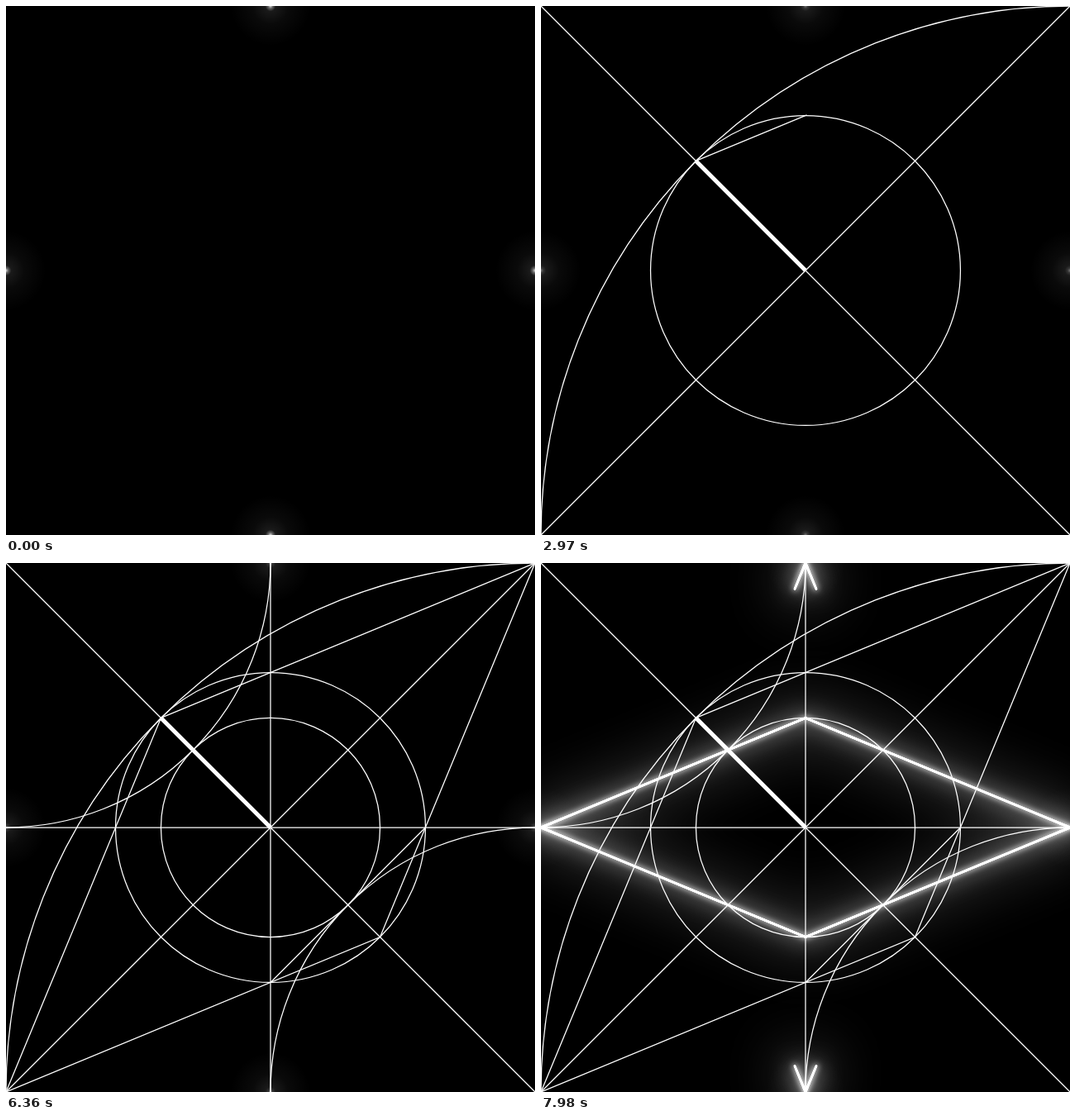
Animation, 640 px wide and 640 px high, one loop 8 s. Source, as an HTML page with a canvas:

```html
<!DOCTYPE html>
<html lang="en">
<head>
<meta charset="utf-8">
<title>Construction lines</title>
<style>
  html, body { margin: 0; width: 100%; height: 100%; overflow: hidden; background: #000; }
  canvas { display: block; width: 100vw; height: 100vh; }
</style>
</head>
<body>
<canvas id="stage" width="640" height="640"></canvas>
<script>
const LOOP = 8000, S = 640, C = S / 2, PI = Math.PI;
const INNER = C * (Math.SQRT2 - 1);   // also the half height of the rhombi
const OUTER = INNER * Math.SQRT2;
const LO = C - INNER, HI = C + INNER;
const ctx = document.getElementById('stage').getContext('2d');

const clamp = x => Math.min(1, Math.max(0, x));
const smooth = s => s * s * (3 - 2 * s);
const strong = s => s < .5 ? (2 * s) ** 2.5 / 2 : 1 - (2 - 2 * s) ** 2.5 / 2;
const part = (t, start, dur, ease = smooth) => ease(clamp((t - start) / dur));

function poly(...p) {
  const path = new Path2D();
  let len = 0;
  path.moveTo(p[0], p[1]);
  for (let i = 2; i < p.length; i += 2) {
    path.lineTo(p[i], p[i + 1]);
    len += Math.hypot(p[i] - p[i - 2], p[i + 1] - p[i - 1]);
  }
  return { path, len };
}

function arc(x, y, r, from, sweep) {
  const path = new Path2D();
  path.arc(x, y, r, from, from + sweep);
  return { path, len: r * sweep };
}

// shape, start, duration
const strokes = [
  [poly(0, S, S, 0), 50, 620],
  [poly(S, S, 0, 0), 50, 620],
  [arc(S, S, S, PI, PI / 2), 671, 712],
  [arc(C, C, OUTER, -.75 * PI, 2 * PI), 2100, 695],
  [poly(LO, LO, S, 0, HI, HI, 0, S, LO, LO), 2810, 966],
  [poly(C, C + OUTER, C + OUTER, C), 3630, 810],
  [arc(0, 0, C, 0, PI / 2), 4449, 611],
  [arc(S, S, C, PI, PI / 2), 4449, 611],
  [arc(C, C, INNER, -.75 * PI, 2 * PI), 5053, 592],
  [poly(S, C, 0, C), 5630, 707],
  [poly(C, S, C, 0), 5630, 707]
];

function trim({ path, len }, f) {
  if (f <= 0) return;
  ctx.setLineDash(f < 1 ? [len * f, len * 2] : []);
  ctx.stroke(path);
  ctx.setLineDash([]);
}

function radius(t) {
  const grow = part(t, 1370, 540);
  if (!grow) return;
  const a = -.75 * PI + 2 * PI * part(t - 6, 2100, 695);
  const r = OUTER * grow;
  ctx.lineWidth = 5;
  ctx.stroke(poly(C, C, C + r * Math.cos(a), C + r * Math.sin(a)).path);
}

function spark(x, y, core) {
  const g = ctx.createRadialGradient(x, y, 0, x, y, 48);
  g.addColorStop(0, `rgba(255,255,255,${core})`);
  g.addColorStop(.06, `rgba(255,255,255,${core * .45})`);
  g.addColorStop(.13, 'rgba(255,255,255,.1)');
  g.addColorStop(.45, 'rgba(255,255,255,.04)');
  g.addColorStop(1, 'rgba(255,255,255,0)');
  ctx.fillStyle = g;
  ctx.fillRect(x - 48, y - 48, 96, 96);
}

// Four arms growing from two opposite tips of a rhombus
function arms(f, upright) {
  const path = new Path2D();
  for (const tip of [0, S]) {
    for (const side of [LO, HI]) {
      const u = tip + (C - tip) * f, v = C + (side - C) * f;
      if (upright) { path.moveTo(C, tip); path.lineTo(v, u); }
      else { path.moveTo(tip, C); path.lineTo(u, v); }
    }
  }
  return path;
}

// width, blur, opacity
const halos = [[30, 70, .3], [12, 26, .38], [5, 7, .65]];

function glow(path) {
  ctx.save();
  ctx.lineCap = ctx.lineJoin = 'round';
  ctx.globalCompositeOperation = 'lighter';
  for (const [w, blur, a] of halos) {
    ctx.save();
    ctx.translate(-2000, 0);
    ctx.shadowOffsetX = 2000;
    ctx.shadowBlur = blur;
    ctx.shadowColor = `rgba(255,255,255,${a})`;
    ctx.lineWidth = w;
    ctx.stroke(path);
    ctx.restore();
  }
  ctx.lineWidth = 2.6;
  ctx.stroke(path);
  ctx.restore();
}

function draw(t) {
  ctx.fillStyle = '#000';
  ctx.fillRect(0, 0, S, S);
  const core = t < 60 ? .85 : .45;
  for (const [x, y] of [[C, 0], [S, C], [C, S], [0, C]]) spark(x, y, core);

  const wide = part(t, 6514, 1246, strong), tall = part(t, 7656, 1246, strong);
  ctx.strokeStyle = '#fff';
  if (wide) glow(arms(wide, false));
  if (tall) glow(arms(tall, true));

  ctx.lineWidth = 1.25;
  for (const [shape, start, dur] of strokes) trim(shape, part(t, start, dur));
  radius(t);
}

const begin = performance.now();
function tick() {
  draw((performance.now() - begin) % LOOP);
  requestAnimationFrame(tick);
}
tick();
</script>
</body>
</html>
```
